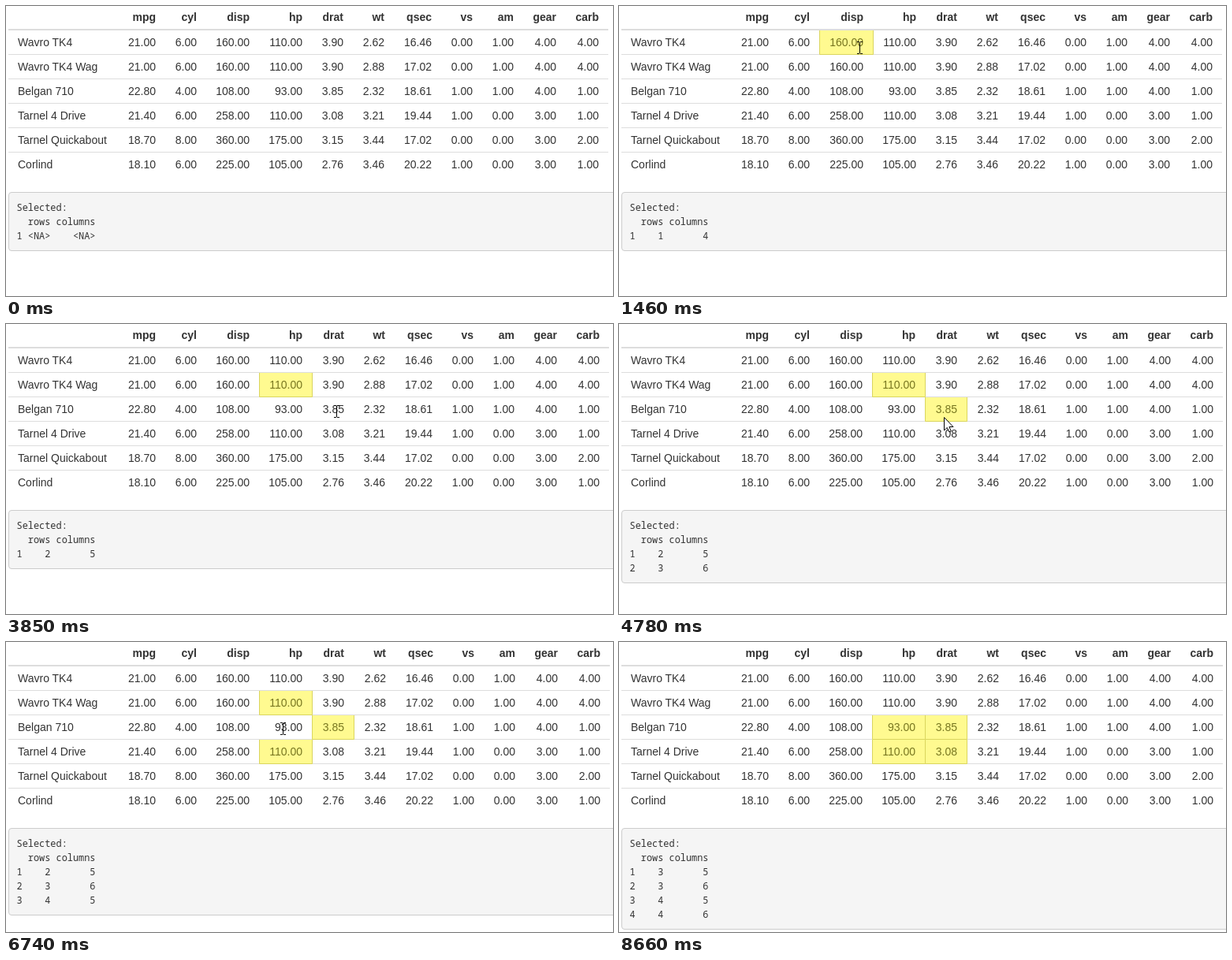
Write an HTML page that moves like this. It is 770 px wide and 368 px high and loops after 9380 ms.

```html
<!DOCTYPE html>
<html lang="en">
<head>
<meta charset="utf-8">
<title>Selectable table cells</title>
<style>
html, body { margin: 0; width: 100%; height: 100%; overflow: hidden; background: #fff; }
svg { display: block; width: 770px; height: 368px; }
text { font: 14px "Liberation Sans", Arial, sans-serif; fill: #333; white-space: pre; }
.head { font-weight: bold; }
.num { text-anchor: end; }
.on { fill: #777620; }
.out { font: 11.91px "Noto Sans Mono", "DejaVu Sans Mono", monospace; }
</style>
</head>
<body>
<svg id="stage" viewBox="0 0 770 368"></svg>
<script>
const LOOP = 9380, LEFT = 3, FIRST = 142, TOP = 30, ROW = 31, PAD = 12;
const DISP = 2, HP = 3, DRAT = 4;
const heads = 'mpg cyl disp hp drat wt qsec vs am gear carb'.split(' ');
const rows = `Wavro TK4|21 6 160 110 3.9 2.62 16.46 0 1 4 4
Wavro TK4 Wag|21 6 160 110 3.9 2.88 17.02 0 1 4 4
Belgan 710|22.8 4 108 93 3.85 2.32 18.61 1 1 4 1
Tarnel 4 Drive|21.4 6 258 110 3.08 3.21 19.44 1 0 3 1
Tarnel Quickabout|18.7 8 360 175 3.15 3.44 17.02 0 0 3 2
Corlind|18.1 6 225 105 2.76 3.46 20.22 1 0 3 1`
  .split('\n').map(line => {
    const [name, nums] = line.split('|');
    return { name, nums: nums.split(' ').map(n => (+n).toFixed(2)) };
  });

const pen = document.createElement('canvas').getContext('2d');
const measure = (s, weight = '') => {
  pen.font = weight + ' 14px "Liberation Sans", Arial, sans-serif';
  return pen.measureText(s).width;
};
const headWidths = heads.map(h => measure(h, 'bold'));
const cellWidths = rows.map(row => row.nums.map(n => measure(n)));

// Cells are [row, column]; a click without ctrl starts a new selection
const clicks = [
  { down: 1310, hold: 70, cells: [[0, DISP]] },
  { down: 2910, hold: 100, cells: [[1, HP]] },
  { down: 4250, hold: 70, cells: [[2, DRAT]], ctrl: true },
  { down: 5570, hold: 150, cells: [[3, HP]], ctrl: true },
  { down: 7030, hold: 1010, cells: [2, 3].flatMap(r => [HP, DRAT].map(c => [r, c])), drag: true }
];
const LAG = 70;

// Pointer moves: start, end, x, y
const SHOW = 370, HIDE = 8660, STEP = 65;
const moves = [
  [448, 1150, 305, 53], [1760, 2380, 366, 82], [3470, 3920, 425, 114], [4780, 5170, 368, 141],
  [6260, 6740, 351, 110], [7110, 7660, 432, 143], [8200, 8590, 560, 349]
];

function pointer(t) {
  let x = 669, y = 343;
  for (const [start, end, toX, toY] of moves) {
    if (t < start) break;
    const n = Math.round((end - start) / STEP);
    const step = Math.min(n, 1 + Math.floor((t - start) / (end - start) * (n - 1) + 1e-6));
    const k = 1 - (1 - step / n) ** 1.2;
    x += (toX - x) * k;
    y += (toY - y) * k;
  }
  return [Math.round(x), Math.round(y)];
}

function state(t) {
  let sel = [], printed = [], pressed = null;
  for (const c of clicks) {
    if (t < c.down) break;
    const up = c.down + c.hold;
    if (!c.ctrl) sel = [];
    if (t >= up) sel = [...sel, ...c.cells];
    else pressed = c;
    if (t >= up + LAG) printed = sel;
  }
  return { sel, printed, pressed };
}

const has = (sel, r, c) => sel.some(s => s[0] === r && s[1] === c);

// Column widths are rounded up; a cell's left border counts towards its width
function columnEdges(sel) {
  let x = FIRST;
  return heads.map((_, c) => x += Math.ceil(2 * PAD + Math.max(headWidths[c],
    ...cellWidths.map((w, r) => w[c] + (has(sel, r, c) || has(sel, r, c - 1) ? 1 : 0)))));
}

const text = (x, y, s, cls = '') =>
  `<text x="${x}" y="${y}" class="${cls}">${s.replace(/</g, '&lt;')}</text>`;
const rect = (x, y, w, h, style) => `<rect x="${x}" y="${y}" width="${w}" height="${h}" ${style}/>`;

function table(sel, edges) {
  const right = edges[edges.length - 1];
  const line = (y, h) => rect(LEFT, y, right - LEFT, h, 'fill="#ddd"');
  let s = line(TOP - 1, 2);
  for (let r = 1; r < rows.length; r++) s += line(TOP + ROW * r, 1);
  for (const [r, c] of sel) {
    const y = TOP + 1 + ROW * r;
    s += `<path d="M${edges[c - 1] + .5} ${y}v${ROW - .5}H${edges[c] + .5}V${y}" fill="#fffa90" stroke="#dad55e"/>`;
  }
  heads.forEach((h, c) => s += text(edges[c] - PAD, 19, h, 'head num'));
  rows.forEach(({ name, nums }, r) => {
    const y = TOP + 21 + ROW * r;
    s += text(LEFT + PAD, y, name);
    nums.forEach((n, c) => s += text(edges[c] - PAD, y, n, has(sel, r, c) ? 'num on' : 'num'));
  });
  return s;
}

function output(sel) {
  const cells = sel.length ? sel.map(([r, c]) => [r + 1, c + 2]) : [['<NA>', '<NA>']];
  const lines = ['Selected:', '  rows columns', ...cells.map(([r, c], i) =>
    i + 1 + String(r).padStart(5) + String(c).padStart(8))];
  return rect(3.5, 236.5, 800, 20 + 18 * lines.length, 'rx="3.5" fill="#f5f5f5" stroke="#ccc"') +
    lines.map((l, i) => text(13.5, 260 + 18 * i, l, 'out')).join('');
}

function overText(x, y, edges) {
  const r = Math.floor((y - TOP) / ROW), dy = y - TOP - r * ROW;
  if (!rows[r] || dy < 8 || dy >= 24) return false;
  return cellWidths[r].some((w, c) => x < edges[c] - PAD && x > edges[c] - PAD - w);
}

function cursor(x, y, beam) {
  return beam
    ? `<path transform="translate(${x - 3} ${y - 8})" d="M0 .5h3m1 0h3M3.5 1v14M0 15.5h3m1 0h3" fill="none" stroke="#000"/>`
    : `<path transform="translate(${x - 1.5} ${y - .5})" d="M0 0V16.5L3.8 13L6.4 18.5L8.8 17.5L6.4 12H11.5Z" fill="#fff" stroke="#000"/>`;
}

function lasso(x, y) {
  const [x0, y0] = pointer(clicks[clicks.length - 1].down).map((v, i) => v - 4 + i);
  return rect(x0 + .5, y0 + .5, Math.max(0, x - 5 - x0), Math.max(0, y - 4 - y0),
    'fill="none" stroke="#000" stroke-dasharray="1 1"');
}

function scene(t) {
  const { sel, printed, pressed } = state(t), edges = columnEdges(sel), [x, y] = pointer(t);
  let s = table(sel, edges) + output(printed);
  if (pressed && pressed.drag) s += lasso(x, y);
  if (t >= SHOW && t < HIDE) s += cursor(x, y, !pressed && overText(x, y, edges));
  return s;
}

const stage = document.getElementById('stage');
let last = '';
function frame() {
  const s = scene(performance.now() % LOOP);
  if (s !== last) stage.innerHTML = last = s;
  requestAnimationFrame(frame);
}
frame();
</script>
</body>
</html>
```
